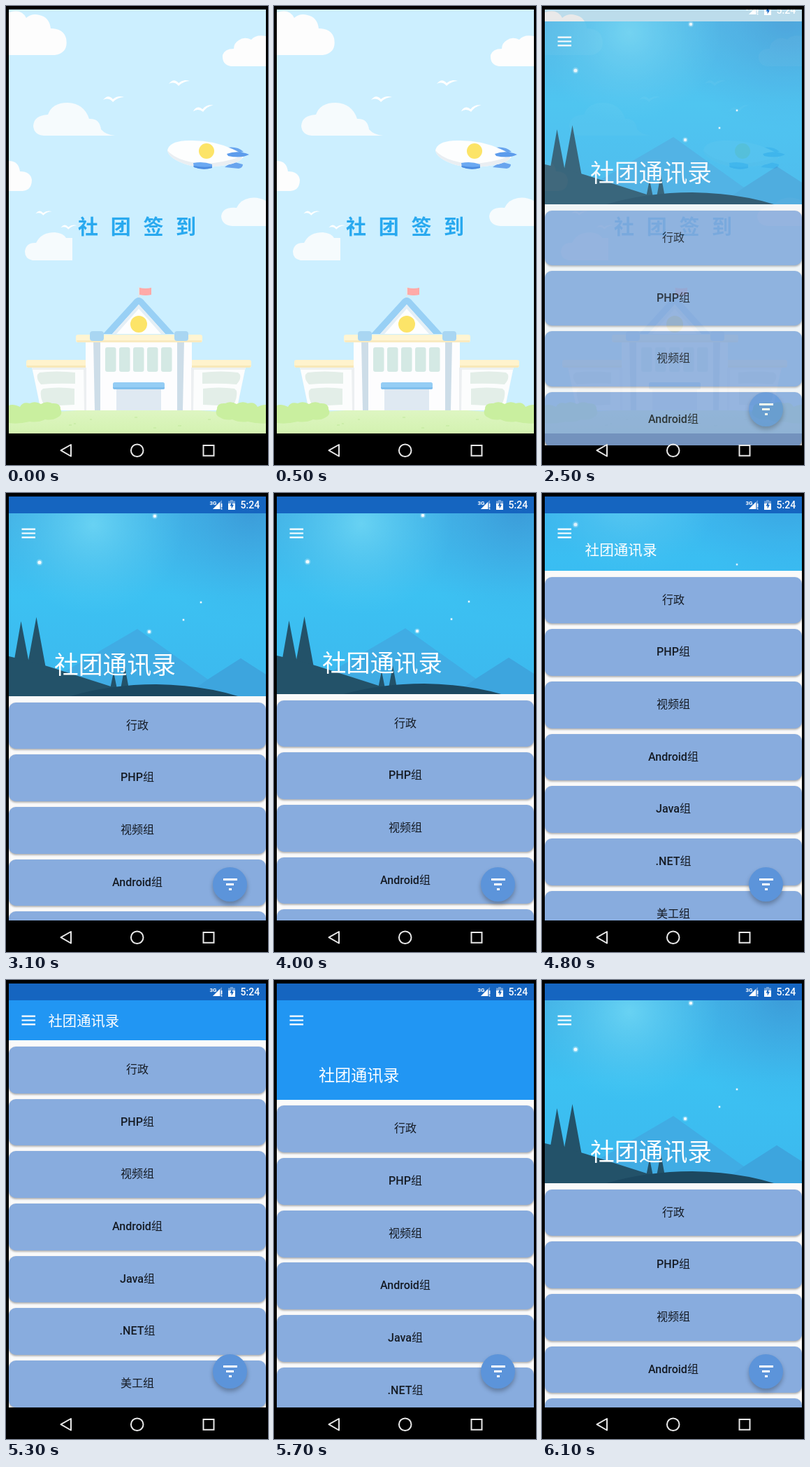
These frames come from a looping animation (375x655 px, 8000 ms). An HTML page:

```html
<!DOCTYPE html>
<html lang="zh-CN">
<head>
<meta charset="utf-8">
<title>社团签到</title>
<style>
html, body { margin: 0; width: 100%; height: 100%; overflow: hidden; background: #000; }
body { position: relative; }
svg { display: block; position: absolute; left: 0; top: 0; }
#splash { font: 900 29px "Noto Sans CJK SC", "Noto Sans CJK", sans-serif; }
#dim { position: absolute; left: 4px; top: 5px; width: 368px; height: 605px; background: rgba(0,0,0,.08); }
#win { position: absolute; left: 4px; top: 5px; width: 368px; height: 605px; overflow: hidden; background: #fafafa; }
#bar { position: absolute; left: 0; top: 0; width: 100%; height: 24px; background: #1565c0; }
#page { position: absolute; left: 0; top: 0; width: 100%; height: 605px; }
#header { position: absolute; left: 0; top: 0; width: 100%; overflow: hidden; background: #3cc0f1; }
#scrim { position: absolute; inset: 0; background: #2196f3; }
#title { position: absolute; line-height: 1; white-space: nowrap; color: #fff;
  font-family: "Noto Sans CJK SC", "Noto Sans CJK", sans-serif; transform: translateY(-55.6%); }
#list { position: absolute; left: 0; width: 100%; padding-top: 8.5px; }
.card { height: var(--h); line-height: var(--h); margin-bottom: 7.9px; border-radius: 10px; background: #88acde;
  box-shadow: 0 1.5px 3px rgba(0,0,0,.34); text-align: center; color: #151b24;
  font-size: 16px; font-family: Roboto, "Noto Sans CJK SC", "Noto Sans CJK", sans-serif; }
.card b { font-weight: 500; }
#fab { position: absolute; left: 292px; top: 529px; width: 49px; height: 49px; border-radius: 50%;
  background: #5c94da; box-shadow: 0 4px 6px rgba(0,0,0,.28); }
#status { position: absolute; left: 4px; top: 5px; width: 368px; height: 24px; overflow: hidden; }
#status svg { font-family: Roboto, sans-serif; fill: #fff; }
</style>
</head>
<body>
<svg id="splash" width="375" height="655" viewBox="0 0 375 655">
  <defs>
    <clipPath id="screen"><path d="M4 5H372V610H4Z"/></clipPath>
    <linearGradient id="lawn" x1="0" y1="0" x2="0" y2="1">
      <stop offset="0" stop-color="#dff6c4"/><stop offset="1" stop-color="#d3f2b0"/>
    </linearGradient>
    <g id="bird"><path d="M-15 3Q-8-6-1 2Q6-4 15-1Q6-1-1 6Q-7-1-15 3Z" fill="#fff"/></g>
    <g id="wing">
      <path d="M37 515H115V577H50Z" fill="#fcfdfd"/>
      <path d="M37 515H115V519H38Z" fill="#eef1f0"/>
      <rect x="29" y="505" width="87" height="11" rx="3" fill="#fff3cd"/>
      <path d="M29 513H116V516H31Z" fill="#f8e8b8"/>
      <path d="M48 523Q72 520 99 523V539Q72 538 50 540Q43 532 45 526Z" fill="#e3eee8"/>
      <path d="M53 546Q76 543 98 546V569Q76 570 55 571Q48 557 50 549Z" fill="#e3eee8"/>
      <path d="M114 480H127V577H114Z" fill="#fdfdfe"/>
      <path d="M111 516H115V577H112Z" fill="#eceff1"/>
      <path d="M125 477H135V577H127Z" fill="#cddde8"/>
      <path d="M4 570Q10 567 20 572Q24 564 34 567Q42 563 50 568Q58 563 66 567Q78 566 78 575Q82 583 74 587Q66 592 56 590Q46 595 34 593Q18 597 4 595Z" fill="#c9ef9f"/>
    </g>
  </defs>
  <g clip-path="url(#screen)">
    <rect x="4" y="5" width="368" height="605" fill="#ccefff"/>
    <g fill="#fdfdfd">
      <path d="M4 9Q22 3 29 17Q37 10 48 13Q62 16 64 32Q82 32 86 46Q90 67 70 70H4Z"/>
      <path d="M372 43Q358 40 351 48Q341 43 333 49Q326 53 326 61Q313 61 310 70Q309 84 322 86H372Z"/>
      <path d="M4 221Q18 221 20 236Q35 236 37 248Q37 263 24 264H4Z"/>
    </g>
    <g fill="#f6fbfd">
      <path d="M54 185Q40 184 39 171Q40 156 60 155Q66 138 88 138Q112 139 119 161Q134 160 136 176Q143 184 156 185Z"/>
      <path d="M372 278Q361 272 349 274Q336 276 330 288Q310 286 308 300Q309 313 324 314H372Z"/>
      <path d="M38 363Q27 361 27 350Q29 337 43 338Q50 323 70 323Q82 324 86 331H95V363Z"/>
    </g>
    <use href="#bird" x="154" y="131"/>
    <use href="#bird" x="248" y="108"/>
    <use href="#bird" transform="translate(282 145) rotate(-10)"/>
    <use href="#bird" transform="translate(54 294) scale(.78)"/>
    <use href="#bird" transform="translate(90 314) scale(.78)"/>
    <g>
      <path d="M317 202Q331 200 340 208L322 212Z" fill="#69a5ee"/>
      <path d="M313 230L324 222L339 226Q339 231 333 232Z" fill="#69a5ee"/>
      <path d="M231 206Q234 192 262 192Q296 191 324 204Q338 210 340 215Q334 224 314 227Q274 234 250 223Q233 216 231 206Z" fill="#fdfefe"/>
      <path d="M231 206Q243 221 280 225Q310 225 338 214Q340 222 314 227Q274 234 250 223Q233 216 231 206Z" fill="#e9eef2"/>
      <path d="M268 224Q282 221 295 226V231Q282 235 269 230Z" fill="#6ba9f2"/>
      <path d="M268 228Q282 231 295 229V231Q282 235 269 230Z" fill="#4c8ce0"/>
      <path d="M316 211Q332 205 348 212Q336 218 318 214Z" fill="#5d9cec"/>
      <circle cx="287" cy="207" r="11" fill="#fce468"/>
    </g>
    <text x="103" y="326" fill="#29a9ef" letter-spacing="17.7">社团签到</text>

    <path d="M189.500 401H191V418H189.500Z" fill="#e3e6e8"/>
    <path d="M191 402Q200 404 208 402V412Q200 414 191 412Z" fill="#ffaaa8"/>
    <path d="M114 478H266V580H114Z" fill="#fdfdfe"/>
    <path d="M4 586Q90 575 188 574Q290 575 372 586V610H4Z" fill="url(#lawn)"/>
    <path d="M135 478H246V577H135Z" fill="#fdfdfe"/>
    <use href="#wing"/>
    <use href="#wing" transform="translate(380) scale(-1 1)"/>
    <path d="M190 416Q194 416 198 421L241 468H139L182 421Q186 416 190 416Z" fill="#98d0f5"/>
    <path d="M190 426L228 468H152Z" fill="#fdfeff"/>
    <path d="M190 426L228 468H222L190 432L158 468H152Z" fill="#e4eff6"/>
    <circle cx="190" cy="454" r="12" fill="#fce468"/>
    <rect x="100" y="469" width="181" height="11" rx="3" fill="#fff5d3"/>
    <path d="M101 477H280V480H102Z" fill="#f9eac0"/>
    <g fill="#a9d6f2"><rect x="120" y="464" width="20" height="14" rx="4"/><rect x="241" y="464" width="20" height="14" rx="4"/></g>
    <g fill="#d4e9e4" id="panes"></g>
    <path d="M158 545H222V577H158Z" fill="#dfe9f2"/>
    <rect x="153" y="537" width="74" height="10" rx="2.500" fill="#94cdf5"/>
    <path d="M153 544H227V546Q226 547 224 547H156Q153 547 153 544Z" fill="#80bfed"/>
    <path d="M90 598h4m3-2h3M184 587h4m58 12h5m38-9h4M120 590h3m88 12h4" stroke="#c0e89b" fill="none"/>
  </g>
</svg>
<div id="dim"></div>
<div id="win">
  <div id="page">
    <div id="list"></div>
    <div id="header">
      <svg id="scene" width="368" height="261" viewBox="4 29 368 261">
        <defs>
          <linearGradient id="sky" x1="0" y1="0" x2="0" y2="1">
            <stop offset="0" stop-color="#45b3e6"/><stop offset=".45" stop-color="#3cc1f2"/><stop offset="1" stop-color="#3cb8ee"/>
          </linearGradient>
          <radialGradient id="glow" gradientUnits="userSpaceOnUse" cx="125" cy="45" r="130">
            <stop offset="0" stop-color="#68d2f3"/><stop offset="1" stop-color="#50c8f2" stop-opacity="0"/>
          </radialGradient>
          <radialGradient id="shade" gradientUnits="userSpaceOnUse" cx="350" cy="20" r="170">
            <stop offset="0" stop-color="#3a98d6" stop-opacity=".9"/><stop offset="1" stop-color="#3cb0ea" stop-opacity="0"/>
          </radialGradient>
        </defs>
        <path d="M4 29H372V290H4Z" fill="url(#sky)"/>
        <path d="M4 29H372V290H4Z" fill="url(#shade)"/>
        <path d="M4 29H372V290H4Z" fill="url(#glow)"/>
        <path d="M80 257L188 194L289 266L336 236L372 259V290H80Z" fill="#40ace4"/>
        <path d="M289 266L336 236L372 259V290H255Z" fill="#3da5de"/>
        <g fill="#235269">
          <path d="M21.500 183L33 243H11ZM43.500 177L57 250H30Z"/>
          <path d="M154 255L159 280H149ZM170 247L176 280H164Z"/>
          <path d="M4 233Q35 240 62 248L150 276L185 290H4Z"/>
        </g>
        <path d="M92 290Q150 273 215 273Q280 274 332 290Z" fill="#1c4860"/>
        <g id="stars" fill="#fff"></g>
      </svg>
      <div id="scrim"></div>
    </div>
    <svg width="60" height="56" fill="#fff"><path d="M18.500 21.500H38V23.700H18.500ZM18.500 27.400H38V29.600H18.500ZM18.500 33.300H38V35.500H18.500Z"/></svg>
    <div id="title">社团通讯录</div>
  </div>
  <div id="bar"></div>
  <div id="fab"><svg width="49" height="49" fill="#fff"><path d="M15 16H35V19H15ZM19 23H30V26H19ZM23 30H27V33H23Z"/></svg></div>
</div>
<div id="status">
  <svg id="icons" width="368" height="24" viewBox="4 5 368 24">
    <text x="291.500" y="16.500" font-size="8" font-weight="700">3G</text>
    <path d="M309 10V23H296Z" opacity=".35"/>
    <path d="M306 13V23H296Z"/>
    <path d="M307.800 15H309.400V20.500H307.800ZM307.800 22H309.400V23.600H307.800Z"/>
    <path d="M321 10H325V11.500H328V24H318V11.500H321Z" opacity=".4"/>
    <path d="M318 15H328V24H318Z"/>
    <path d="M324 12.500L320.500 18.500H322.700V22.500L326 16.800H324Z" fill="#1565c0"/>
    <text x="335.500" y="22.300" font-size="14" font-weight="500">5:24</text>
  </svg>
</div>
<svg width="375" height="655" fill="none" stroke="#e8e8e8" stroke-width="2">
  <path d="M93 626V642.500L78.500 634.200Z" stroke-linejoin="round"/>
  <circle cx="187.700" cy="634.200" r="8.800"/>
  <path d="M282.500 627H297.500V641.700H282.500Z"/>
</svg>
<script>
const LOOP = 8000, FRAME = 100;
const FULL = 261, LOW = 82, MIN = 56;
const $ = id => document.getElementById(id);
const clamp = x => Math.max(0, Math.min(1, x));
const span = (t, a, b) => clamp((t - a) / (b - a));
const smooth = x => x * x * (3 - 2 * x);
const mix = (a, b, k) => a + (b - a) * k;

$('panes').innerHTML = [0, 1, 2, 3, 4].map(i =>
  `<rect x="${142 + i * 20}" y="487" width="15.500" height="35" rx="3"/>`).join('');

$('stars').innerHTML = [[48, 99, 2.6], [213, 33, 2.3], [205, 198, 2.2], [279, 156, 1.2], [254, 181, 1.2]]
  .map(([x, y, r]) => `<circle cx="${x}" cy="${y}" r="${r * 1.7}" opacity=".25"/><circle cx="${x}" cy="${y}" r="${r}" opacity=".9"/>`).join('');

$('list').innerHTML = ['行政', '<b>PHP</b>组', '视频组', '<b>Android</b>组', '<b>Java</b>组', '<b>.NET</b>组', '美工组']
  .map(s => `<div class="card">${s}</div>`).join('');

function headerHeight(t) {
  if (t < 4800) return mix(FULL, LOW, smooth(span(t, 3900, 4800) ** 1.17));
  if (t < 5200) return mix(LOW, MIN, 1 - (1 - span(t, 4800, 5100)) ** 2);
  return mix(MIN, FULL, smooth(span(t, 5200, 6100) ** 1.375));
}

function render(t) {
  const open = t >= 2500, settled = t >= 2900;
  for (const id of ['win', 'dim', 'status']) $(id).style.display = open ? 'block' : 'none';
  if (!open) return;

  // window slides up while fading in
  const rest = (1 - span(t, 2500, 2700)) ** 2;
  $('win').style.opacity = 1 - .15 * rest;
  $('win').style.transform = `translateY(${17 * rest}px)`;
  $('icons').style.transform = `translateY(${-11 * rest}px)`;

  // status bar inset
  $('bar').style.display = settled ? 'block' : 'none';
  $('page').style.top = (settled ? 24 : 0) + 'px';
  $('list').style.setProperty('--h', settled ? '66.8px' : '78.5px');

  // collapsing header
  const h = headerHeight(t), k = (h - MIN) / (FULL - MIN);
  $('header').style.height = h + 'px';
  $('list').style.top = h + 'px';
  $('scene').style.top = -.3 * (FULL - h) + 'px';
  $('scrim').style.opacity = t < 5200 ? span(t, 4770, 5100) : 1 - span(t, 5700, 6100);
  const title = $('title').style;
  title.left = mix(56.5, 65, k) + 'px';
  title.top = mix(28, 216, k) + 'px';
  title.fontSize = mix(20.3, 34.8, k ** 1.9) + 'px';
}

function tick() {
  const t = performance.now() % LOOP;
  render(Math.floor(t / FRAME) * FRAME);
  requestAnimationFrame(tick);
}
tick();
</script>
</body>
</html>
```
